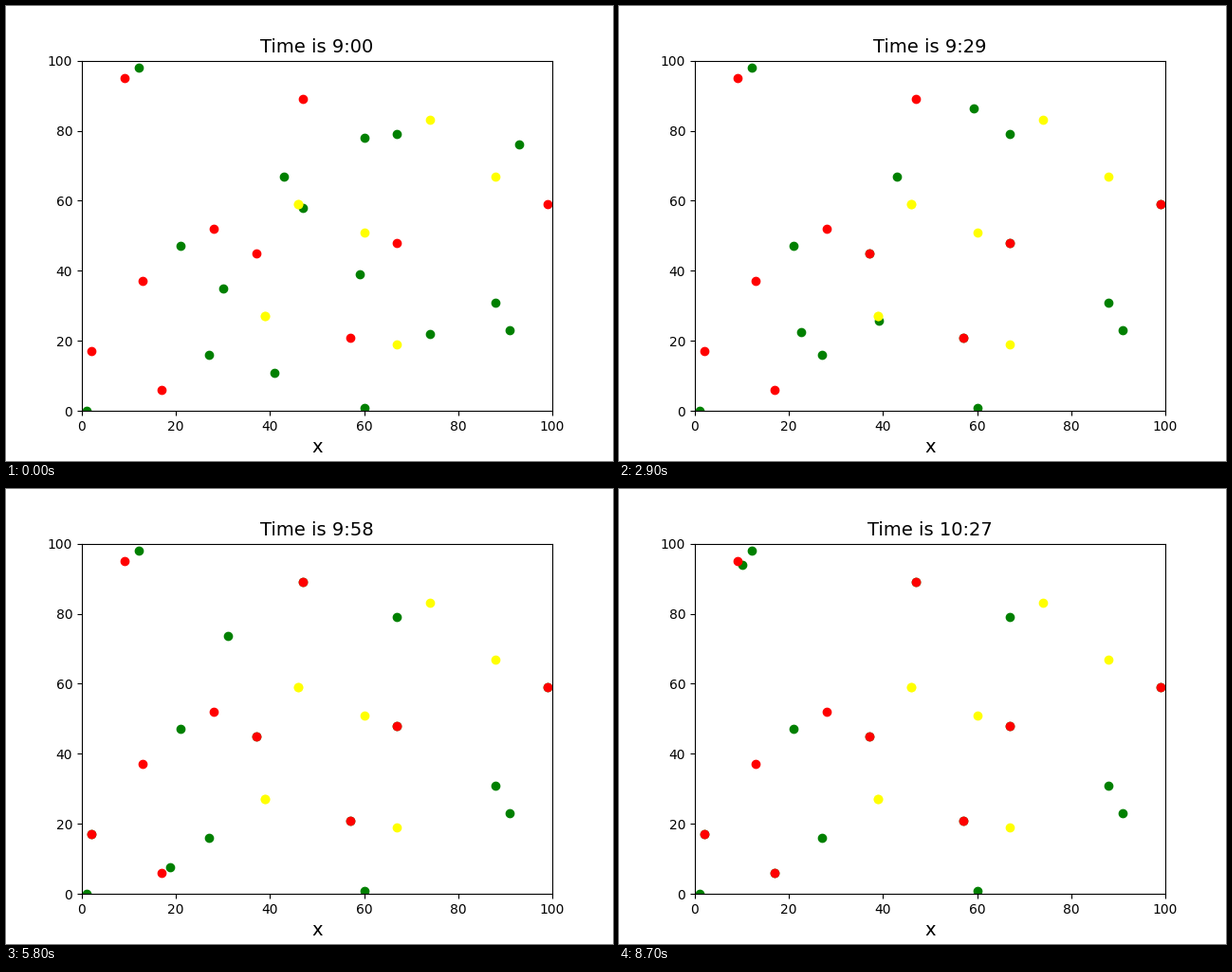
A matplotlib script for the animation above (8.8 s loop, 640 by 480 pixels).

```python
import math

import matplotlib.pyplot as plt
from matplotlib.animation import FuncAnimation

FRAMES = 88
INTERVAL = 100
OPENING = 9 * 60

STOPS = [(46, 59), (74, 83), (88, 67), (60, 51), (39, 27), (67, 19)]
# departure minute, home, goal; each rider calls at the stop nearest home
TRIPS = [
    (0, (60, 78), (47, 89)),
    (0, (93, 76), (99, 59)),
    (0, (59, 39), (67, 48)),
    (0, (30, 35), (2, 17)),
    (1, (47, 58), (37, 45)),
    (7, (74, 22), (57, 21)),
    (14, (41, 11), (17, 6)),
    (29, (43, 67), (9, 95)),
]
IDLE_RIDERS = [(12, 98), (67, 79), (21, 47), (27, 16),
               (88, 31), (91, 23), (60, 1), (1, 0)]
IDLE_GOALS = [(28, 52), (13, 37)]


def nearest_stop(home):
    return min(STOPS, key=lambda stop: math.dist(stop, home))


def walk(a, b, steps):
    k = steps / math.dist(a, b)
    return a[0] + (b[0] - a[0]) * k, a[1] + (b[1] - a[1]) * k


def position(trip, minute):
    """One unit per minute; the last partial step of a leg snaps to its end."""
    start, home, goal = trip
    stop = nearest_stop(home)
    left = max(0, minute - start)
    for a, b in ((home, stop), (stop, goal)):
        steps = math.floor(math.dist(a, b))
        if left < steps:
            return walk(a, b, left)
        left -= steps
    return goal


def riders(minute):
    return IDLE_RIDERS + [position(trip, minute) for trip in TRIPS]


def clock(minute):
    hour, rest = divmod(OPENING + minute, 60)
    return f"Time is {hour}:{rest:02d}"


def dots(points, color):
    return ax.plot(*zip(*points), "o", color=color)[0]


fig, ax = plt.subplots(figsize=(6.4, 4.8), dpi=100)
ax.set(xlim=(0, 100), ylim=(0, 100))
ax.set_xlabel("x", fontsize=14)
title = ax.set_title(clock(0), fontsize=14)
green = dots(riders(0), "green")
dots(IDLE_GOALS + [goal for _, _, goal in TRIPS], "red")
# one dot per trip, so shared stops are drawn twice
dots([nearest_stop(home) for _, home, _ in TRIPS], "yellow")


def update(minute):
    green.set_data(*zip(*riders(minute)))
    title.set_text(clock(minute))
    return green, title


anim = FuncAnimation(fig, update, frames=FRAMES, interval=INTERVAL,
                     init_func=lambda: update(0), repeat=True,
                     repeat_delay=0, blit=False)
plt.show()
```
